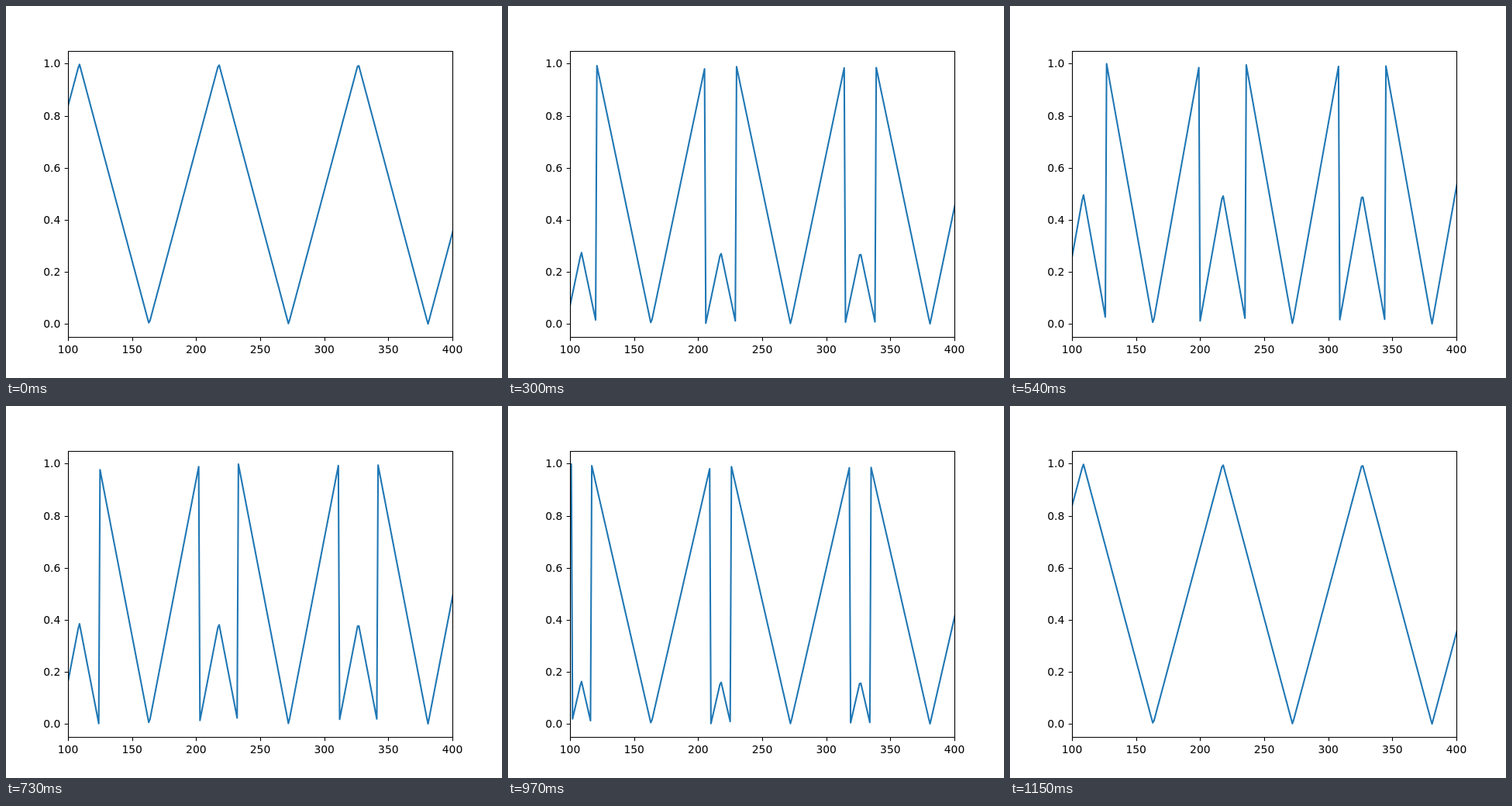
Write an HTML page with a canvas that moves like this. It is 640 px wide and 480 px high and loops after 1210 ms.

```html
<!DOCTYPE html>
<html lang="en">
<head>
<meta charset="utf-8">
<title>Wrapped triangle wave</title>
<style>
  html, body { margin: 0; overflow: hidden; background: #fff; }
  canvas { display: block; }
</style>
</head>
<body>
<canvas id="plot" width="640" height="480"></canvas>
<script>
const ctx = document.getElementById('plot').getContext('2d');
const BOX = { x: 80, y: 57.6, w: 496, h: 369.6 };
const PERIOD = 48000 / 441;
const STEP = 60, STEPS = 9, FALL = 670, LOOP = 1210;

const px = x => BOX.x + (x - 100) / 300 * BOX.w;
const py = y => BOX.y + (1.05 - y) / 1.1 * BOX.h;
const snap = v => Math.floor(v + 0.5) + 0.5;
const triangle = x => Math.abs(2 * (x / PERIOD % 1) - 1);

function stepAt(t) {
  return t < FALL
    ? Math.min(STEPS, Math.floor(t / STEP))
    : Math.max(0, STEPS - 1 - Math.floor((t - FALL) / STEP));
}

function drawWave(gain) {
  ctx.save();
  ctx.beginPath();
  ctx.rect(BOX.x, BOX.y, BOX.w, BOX.h);
  ctx.clip();
  ctx.beginPath();
  for (let x = 99; x <= 401; x++) ctx.lineTo(px(x), py(triangle(x) * gain % 1));
  ctx.strokeStyle = '#1f77b4';
  ctx.lineWidth = 2.083;
  ctx.lineJoin = 'round';
  ctx.stroke();
  ctx.restore();
}

function drawAxes() {
  const left = snap(BOX.x), top = snap(BOX.y);
  const right = snap(BOX.x + BOX.w), bottom = snap(BOX.y + BOX.h);
  ctx.strokeStyle = ctx.fillStyle = '#000';
  ctx.lineWidth = 1.11;
  ctx.font = '13.889px "DejaVu Sans", sans-serif';
  ctx.beginPath();
  ctx.rect(left, top, right - left, bottom - top);

  ctx.textAlign = 'center';
  for (let x = 100; x <= 400; x += 50) {
    ctx.moveTo(snap(px(x)), bottom);
    ctx.lineTo(snap(px(x)), bottom + 4.86);
    ctx.fillText(x, px(x), 448);
  }
  ctx.textAlign = 'right';
  for (let i = 0; i <= 5; i++) {
    const y = py(i / 5);
    ctx.moveTo(left, snap(y));
    ctx.lineTo(left - 4.86, snap(y));
    ctx.fillText((i / 5).toFixed(1), 70.3, Math.round(y + 5.07));
  }
  ctx.stroke();
}

function draw() {
  const step = stepAt((performance.now() - start) % LOOP);
  ctx.fillStyle = '#fff';
  ctx.fillRect(0, 0, 640, 480);
  drawWave(1 + step / 18);
  drawAxes();
  requestAnimationFrame(draw);
}

const start = performance.now();
draw();
</script>
</body>
</html>
```
